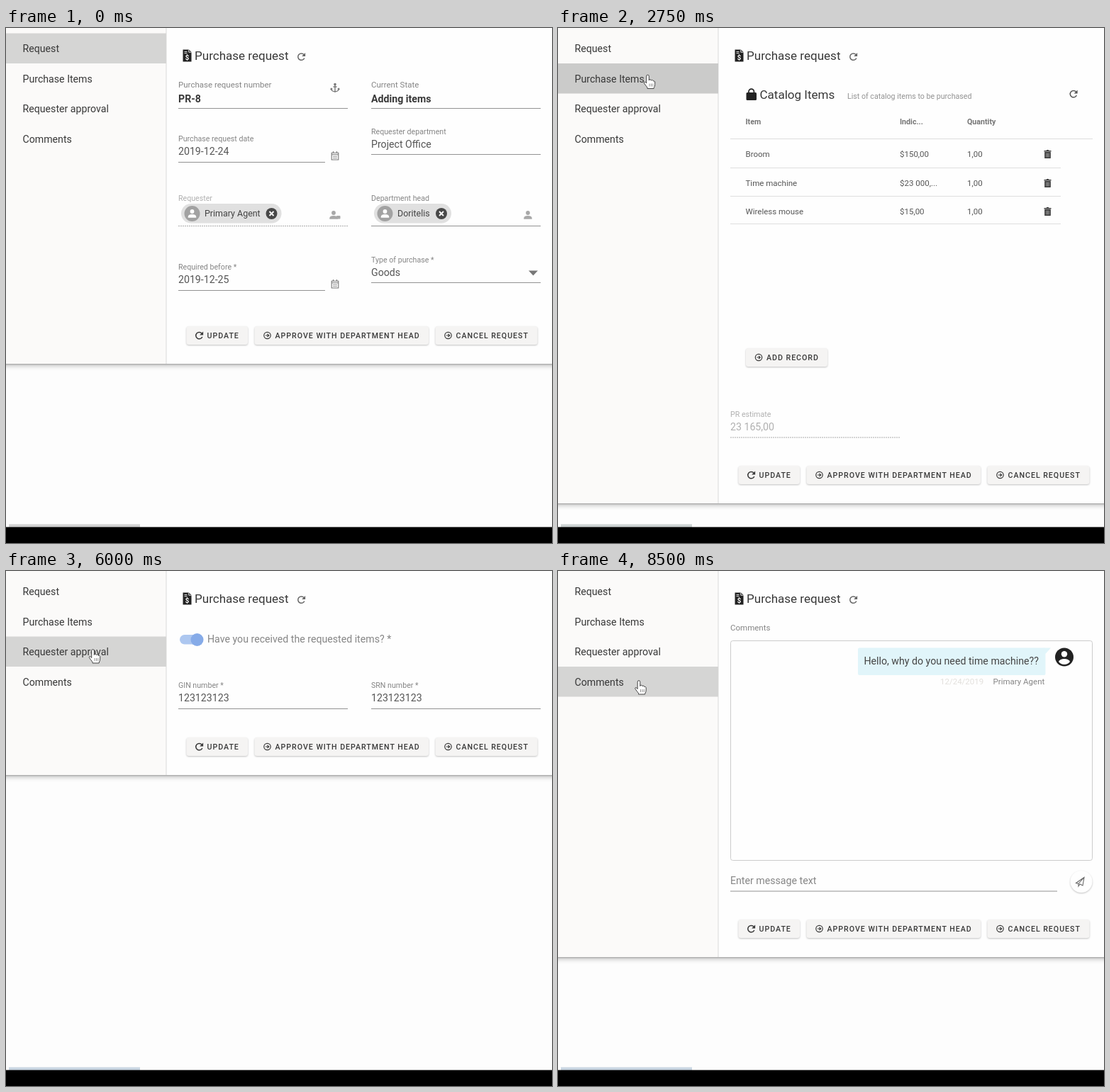
Write an HTML page that moves like this. It is 770 px wide and 727 px high and loops after 10 s.

```html
<!DOCTYPE html>
<html lang="en">
<head>
<meta charset="utf-8">
<title>Purchase request</title>
<style>
html, body { margin: 0; width: 100%; height: 100%; overflow: hidden; background: #fdfdfd; }
svg { display: block; width: 770px; height: 727px; font-family: Roboto, sans-serif; }
text { white-space: pre; }
.card { filter: drop-shadow(0 1px 1px rgba(0,0,0,.24)) drop-shadow(0 3px 3px rgba(0,0,0,.22)); }
.raised { filter: drop-shadow(0 1px 1px rgba(0,0,0,.24)); }
</style>
</head>
<body>
<svg id="stage" viewBox="0 0 770 727"></svg>
<script>
const ROW_TOP = 7.5, ROW_H = 42.5;
const SMALL = 10.65, MID = 11.5, BODY = 14.17, HEAD = 17.05;
const INK = '#383838', VALUE = '#555', LABEL = '#858585', PALE = '#b0b0b0';
const ADMIN = 'Primary Agent', CHIEF = 'Doritelis';

const text = (x, y, str, size = BODY, fill = INK, extra = '') =>
  `<text x="${x}" y="${y}" font-size="${size}" fill="${fill}" ${extra}>${str}</text>`;
const rect = (x, y, w, h, fill, r = 0, extra = '') =>
  `<rect x="${x}" y="${y}" width="${w}" height="${h}" rx="${r}" fill="${fill}" ${extra}/>`;
const circle = (x, y, r, fill) => `<circle cx="${x}" cy="${y}" r="${r}" fill="${fill}"/>`;
const path = (d, fill, extra = '') => `<path d="${d}" fill="${fill}" ${extra}/>`;
const stroke = (d, color, width = 1, extra = '') =>
  path(d, 'none', `stroke="${color}" stroke-width="${width}" ${extra}`);
const line = (x1, x2, y, color = '#929292', extra = '') => stroke(`M${x1} ${y}H${x2}`, color, 1, extra);
const dotted = (x1, x2, y) => line(x1, x2, y, '#aaa', 'stroke-dasharray="2 1"');
const at = (x, y, body) => `<g transform="translate(${x} ${y})">${body}</g>`;

const refresh = (x, y, color) => at(x, y,
  stroke('M3.6-2.9A4.7 4.7 0 1 0 4.3 2', color, 1.5) + path('M5.6-5.6V-.6H.6z', color));
const goIcon = (x, y) => at(x, y,
  stroke('M-4.7 0a4.7 4.7 0 1 0 9.4 0a4.7 4.7 0 1 0-9.4 0M-2.6 0H2M0-2.2L2.2 0 0 2.2', INK, 1.2));
const calendar = y => at(464, y,
  stroke('M-4.8-4.3h9.6v9.8h-9.6zM-4.8-1.7h9.6M-2.5-6.5v2.2M2.5-6.5v2.2', '#777', 1.1) +
  stroke('M-3 .8h6M-3 3.2h6', '#999'));
const person = (x, y, color) => at(x, y,
  circle(0, -3, 2.9, color) + path('M-5.7 5.7V4Q-5.2 1 0 1T5.7 4V5.7z', color));
const trash = y => at(690.5, y,
  path('M-5-5h3l1-1h2l1 1h3v1.5H-5zM-4.3-3h8.6V6h-8.6z', '#3a3a3a') +
  stroke('M-1.8-1.5v6M0-1.5v6M1.8-1.5v6', '#ccc', .7));
const anchor = at(464, 84, circle(0, -4.5, 1.8, '#777') +
  stroke('M0-3.5V6M-2.5-1h5M-5.5 1.5Q-5 5.5 0 6Q5 5.5 5.5 1.5M-6.3 3l1-1.7 1.6 1.2M6.3 3l-1-1.7-1.6 1.2', '#777', 1.4));

const field = (x, x2, y, label, value) => text(x, y, label, SMALL, LABEL) +
  text(x, y + 19, value, BODY, VALUE) + line(x, x2, Math.floor(y + 29) + .5);
const chip = (x, w, name) => rect(x, 248, w, 27.5, '#e0e0e0', 13.75) +
  circle(x + 15.5, 262, 11, '#a2a2a2') + person(x + 15.5, 262, '#fff') +
  text(x + 33, 266, name, 12.45, '#444') + circle(x + w - 14, 262, 8, '#484848') +
  stroke(`M${x + w - 17} 259l6 6m0-6l-6 6`, '#fff', 1.8);
const button = (x, w, cy, label, icon = goIcon) =>
  rect(x, cy - 13, w, 26, '#f5f4f3', 3.5, 'class="raised"') + icon(x + 18, cy, INK) +
  text(x + 29, cy + 3.8, label, SMALL, INK, 'font-weight="500" letter-spacing=".97"');
const money = (y, name, price) => text(264.5, y, name, MID, VALUE) +
  text(482, y, price, MID, VALUE) + text(577, y, '1,00', MID, VALUE) + trash(y - 4);
const th = (x, label) => text(x, 136, label, SMALL, '#757575', 'font-weight="600"');

const requestView =
  text(243, 83.5, 'Purchase request number', MID, LABEL) + anchor +
  text(243, 105, 'PR-8', BODY, INK, 'font-weight="700"') + line(243, 482, 113.5) +
  text(515, 83.5, 'Current State', MID, LABEL) +
  text(515, 105, 'Adding items', BODY, INK, 'font-weight="700"') + line(515, 754, 113.5) +
  field(243, 450, 160, 'Purchase request date', '2019-12-24') + calendar(180.5) +
  field(515, 754, 149.5, 'Requester department', 'Project Office') +
  text(243, 243.5, 'Requester', SMALL, PALE) + chip(247, 141.5, ADMIN) +
  person(462, 264, '#a8a8a8') + rect(466, 265, 5.5, 4.5, '#a8a8a8', 1) + dotted(243, 482, 279.5) +
  text(515, 243.5, 'Department head', SMALL, LABEL) + chip(519, 109, CHIEF) +
  person(736, 264, '#a8a8a8') + line(515, 754, 279.5) +
  field(243, 450, 341, 'Required before *', '2019-12-25') + calendar(361.5) +
  field(515, 754, 330.5, 'Type of purchase *', 'Goods') + path('M737 342.5h13l-6.5 7z', '#777');

const itemsView =
  rect(265.5, 91, 14.5, 11, '#222', 1.5) + stroke('M269 92v-2.2a3.7 3.7 0 0 1 7.4 0V92', '#222', 1.7) +
  text(284.5, 100.3, 'Catalog Items', HEAD) +
  text(408, 100.3, 'List of catalog items to be purchased', SMALL, '#929292') +
  refresh(727, 93, '#555') + th(264.5, 'Item') + th(482, 'Indic...') + th(577, 'Quantity') +
  line(243, 754, 156.5, '#dedede') + [197.5, 237.5, 276.5].map(y => line(243, 709, y, '#dedede')).join('') +
  money(182, 'Broom', '$150,00') + money(223, 'Time machine', '$23 000,...') +
  money(263, 'Wireless mouse', '$15,00') + button(265, 115, 465, 'ADD RECORD') +
  text(243, 548.5, 'PR estimate', SMALL, PALE) + text(243, 568, '23 165,00', BODY, PALE) + dotted(243, 482, 578);

const approvalView =
  rect(245, 90, 32, 13.5, '#adc7f0', 6.75) + `<circle id="knob" cx="269.5" cy="97" r="9"/>` +
  text(284, 101, 'Have you received the requested items? *', BODY, '#858585') +
  field(243, 482, 165, 'GIN number *', '123123123') + field(515, 754, 165, 'SRN number *', '123123123');

const commentsView =
  text(243, 83.5, 'Comments', MID, LABEL) +
  rect(243.5, 98.5, 510, 310, 'none', 3, 'stroke="#ccc"') +
  rect(423, 108.5, 264.5, 38.5, '#e1f5fa', 2) + path('M685 108.5H695L687.5 117z', '#e1f5fa') +
  text(431.5, 132, 'Hello, why do you need time machine??', BODY, '#454545') +
  circle(714, 121.5, 13, '#222') + circle(714, 117.3, 4.2, '#fff') +
  path('M706 128Q708 124 714 124T722 128Q719 132 714 132T706 128z', '#fff') +
  text(539, 160, '12/24/2019', MID, '#e2e0dc') + text(613.5, 160, ADMIN, MID, '#858585') +
  text(243, 442, 'Enter message text', BODY, '#858585') + line(243, 704, 452) +
  `<g class="raised">${circle(738, 438.5, 15.5, '#fefefe')}</g>` +
  stroke('M730.5 440.5L742 432.5 740 444 736 442 734 445V441.5zM734 441.5L742 432.5', '#666', 1.1);

const views = [[requestView, 474], [itemsView, 671], [approvalView, 288], [commentsView, 545]];
const menu = ['Request', 'Purchase Items', 'Requester approval', 'Comments'];

const drawView = ([body, bottom]) => {
  const cy = bottom - 40;
  return `<g class="view">${rect(-10, -10, 790, bottom + 10, '#fefefe', 0, 'class="card"')}` +
    rect(0, 0, 226, bottom, '#fbfaf9') + stroke(`M226 0V${bottom}`, '#d9d9d9') + body +
    button(254.5, 86.5, cy, 'UPDATE', refresh) + button(350.5, 245.5, cy, 'APPROVE WITH DEPARTMENT HEAD') +
    button(605.5, 144, cy, 'CANCEL REQUEST') + '</g>';
};

const docIcon = path('M-6-8.5H2.5L6-5V8.5H-6z', '#222') +
  stroke('M-4-5.5h4M-4-3.3h4M2.3-8.5v3.7H6', '#fff', .9) +
  text(0, 6.2, '$', 9.5, '#fff', 'font-weight="700" text-anchor="middle"');
const hand = path('M-1.8 1.5a1.8 1.8 0 0 1 3.6 0V7.5q0-1.5 1.6-1.3 1.4.2 1.5 1.3 1-.9 2.1-.3 1 .5 1 1.3 1.6-.6 2.2 1V13' +
  'q0 3-1.5 5V19H-.5V17.5Q-2.5 15-5 11.5q-.7-1.8.7-2 1.3 0 2.5 2z', '#fff', 'stroke="#444" stroke-linejoin="round"') +
  stroke('M2.5 12v4M5 12v4M7.3 12v4', '#777', .8);

const $ = id => document.getElementById(id);
$('stage').innerHTML = rect(0, 0, 770, 727, '#fdfdfd') + views.map(drawView).join('') +
  menu.map((_, i) => rect(0, ROW_TOP + i * ROW_H, 226, ROW_H, 'none', 0, `id="row${i}"`)).join('') +
  `<clipPath id="rowClip"><rect id="clipRow" width="226" height="${ROW_H}"/></clipPath>
   <g clip-path="url(#rowClip)"><circle id="ripple" fill="#b2b2b0"/></g>` +
  menu.map((name, i) => text(23.5, 34.1 + i * ROW_H, name)).join('') +
  at(255.5, 39, docIcon) + text(266, 45, 'Purchase request', HEAD) + refresh(416.5, 40.5, '#666') +
  `<rect id="status" x="4" y="700.5" width="185" height="5"/>` + rect(0, 704.5, 770, 23, '#000') +
  `<g id="cursor">${hand}</g>`;

const FOCUS = '#d5d5d4', ACTIVE = '#dededd', HOVER = '#f0f0ef', PRESS = '#e4e3e1', DARK = '#cbcbca';
// time, view, pointer tip, row colours by index, ripple [row, centre x, radius]
const steps = [
  [0, 0, null, { 0: FOCUS }],
  [2000, 0, [126.5, 66.5], { 0: ACTIVE, 1: HOVER }],
  [2500, 0, [126.5, 66.5], { 0: ACTIVE, 1: PRESS }, [1, 115.5, 93]],
  [2750, 1, [126.5, 66.5], { 1: DARK }],
  [3000, 1, [126.5, 66.5], { 1: FOCUS }],
  [4750, 1, [124, 96], { 1: ACTIVE, 2: HOVER }],
  [5000, 1, [122.5, 111], { 1: ACTIVE, 2: HOVER }],
  [5500, 1, [122.5, 111], { 1: ACTIVE, 2: PRESS }, [2, 117, 71]],
  [5750, 2, [122.5, 111], { 2: DARK }],
  [6000, 2, [122.5, 111], { 2: FOCUS }],
  [7250, 2, [120, 126], { 2: FOCUS }],
  [7500, 2, [116, 148], { 2: ACTIVE, 3: HOVER }],
  [7750, 2, [114, 155], { 2: ACTIVE, 3: HOVER }],
  [8000, 3, [114, 155], { 3: PRESS }, [3, 113, 90]],
  [8250, 3, [114, 155], { 3: DARK }],
  [8500, 3, [114, 155], { 3: FOCUS }]
];
const groups = document.querySelectorAll('.view');
const set = (id, attrs) => Object.entries(attrs).forEach(([k, v]) => $(id).setAttribute(k, v));

function draw(now) {
  const t = now % 10000;
  const [, view, tip, rows, ripple] = steps.findLast(s => s[0] <= t);
  groups.forEach((g, i) => g.style.display = i === view ? '' : 'none');
  menu.forEach((_, i) => set('row' + i, { fill: rows[i] || 'none' }));
  const [row, cx, r] = ripple || [0, 0, 0];
  set('clipRow', { y: ROW_TOP + row * ROW_H });
  set('ripple', { cx, cy: ROW_TOP + (row + .5) * ROW_H, r });
  $('cursor').style.display = tip ? '' : 'none';
  if (tip) set('cursor', { transform: `translate(${tip})` });
  set('knob', { fill: t < 7750 ? '#86abe8' : '#7baafa' });
  set('status', { fill: t < 2750 ? '#d2d2d2' : t < 3000 ? '#cdd3d3' : '#c9d6e2' });
}
function loop() {
  draw(performance.now());
  requestAnimationFrame(loop);
}
loop();
</script>
</body>
</html>
```
